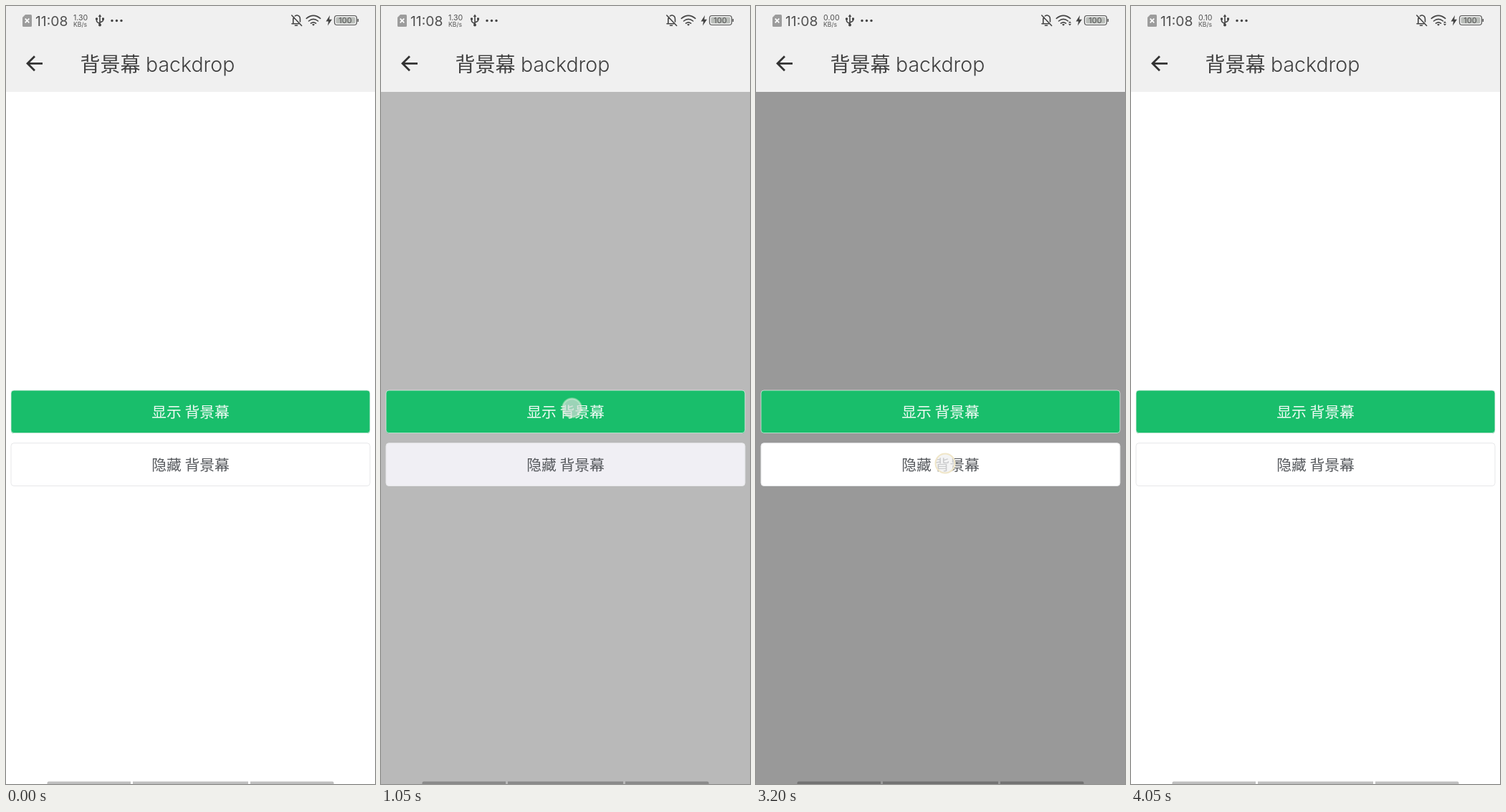
An HTML page for the animation above (4200 ms loop, 515 by 1087 pixels).

```html
<!DOCTYPE html>
<html lang="zh-CN">
<head>
<meta charset="utf-8">
<title>背景幕 backdrop</title>
<style>
html, body { margin: 0; width: 100%; height: 100%; overflow: hidden; background: #fff; }
svg { display: block; width: 515px; height: 1087px; }
text { font-family: Inter, "Noto Sans CJK SC", "Noto Sans CJK", sans-serif; fill: #505050; }
.cjk { font-family: "Noto Sans CJK SC", "Noto Sans CJK", sans-serif; font-weight: 300; }
.title { font-size: 28px; fill: #404040; }
.latin { font-size: 28.5px; font-weight: 300; fill: #404040; }
.label { font-size: 20.8px; text-anchor: middle; }
.rate { font-size: 10.6px; }
.line { fill: none; stroke: #444; stroke-width: 1.6; stroke-linecap: round; stroke-linejoin: round; }
.ink { fill: #444; }

/* every value holds until the next key, as on a 50 ms screen refresh */
.anim { animation: 4200ms step-end infinite; }
.shade { animation-name: shade; opacity: 0; }
.plain { animation-name: press; fill: #fff; }
.touch-a { animation-name: touchA; opacity: 0; }
.touch-b { animation-name: touchB; opacity: 0; }
.fast { animation-name: fast; }
.idle { animation-name: idle; opacity: 0; }
.slow { animation-name: slow; opacity: 0; }
.traffic { animation-name: traffic; opacity: 0; }

@keyframes shade {
  0% { opacity: 0; }
  22.61% { opacity: .024; }
  23.8% { opacity: .15; }
  24.99% { opacity: .275; }
  26.18% { opacity: .4; }
  78.56% { opacity: .388; }
  79.75% { opacity: .263; }
  80.94% { opacity: .135; }
  82.13%, 100% { opacity: 0; }
}
@keyframes press {
  0% { fill: #fff; }
  24.99% { fill: #f0eff4; }
  27.37% { fill: #f0f0f0; }
  45.23% { fill: #fff; }
  78.56% { fill: #f0f0f0; }
  84.51%, 100% { fill: #fff; }
}
@keyframes touchA {
  0% { opacity: 0; }
  21.42% { opacity: 1; }
  24.99% { opacity: .88; }
  26.18% { opacity: .4; }
  27.37%, 100% { opacity: 0; }
}
@keyframes touchB {
  0% { opacity: 0; }
  76.18% { opacity: 1; }
  79.75% { opacity: .8; }
  80.94%, 100% { opacity: 0; }
}
@keyframes fast { 0% { opacity: 1; } 33.32%, 100% { opacity: 0; } }
@keyframes idle { 0% { opacity: 0; } 33.32% { opacity: 1; } 86.89%, 100% { opacity: 0; } }
@keyframes slow { 0% { opacity: 0; } 86.89%, 100% { opacity: 1; } }
@keyframes traffic {
  0% { opacity: 0; }
  33.32% { opacity: 1; }
  52.37% { opacity: 0; }
  73.8%, 100% { opacity: 1; }
}
</style>
</head>
<body>
<svg viewBox="0 0 515 1087">
  <defs>
    <radialGradient id="tip">
      <stop offset="0" stop-color="#d4dcd8" stop-opacity=".8"/>
      <stop offset=".72" stop-color="#d4dcd8" stop-opacity=".8"/>
      <stop offset=".86" stop-color="#eef2e8" stop-opacity=".85"/>
      <stop offset="1" stop-color="#c8e6c0" stop-opacity=".3"/>
    </radialGradient>
  </defs>

  <rect width="515" height="1087" fill="#fff"/>
  <rect class="anim shade" y="120" width="515" height="967"/>
  <rect width="515" height="120" fill="#f0f0f0"/>

  <!-- status bar, left -->
  <path d="M27 12h7.500q1.500 0 1.500 1.500v14q0 1.500-1.500 1.500h-10q-1.500 0-1.500-1.500V16z" fill="#9c9c9c"/>
  <path d="M26.700 17.700l5.600 5.600m0-5.600l-5.600 5.600" stroke="#fff" stroke-width="1.700"/>
  <text x="41" y="28" font-size="19.300">11:08</text>
  <g class="rate">
    <text class="anim fast" x="94" y="20">1.30</text>
    <text class="anim idle" x="94" y="20">0.00</text>
    <text class="anim slow" x="94" y="20">0.10</text>
  </g>
  <text x="94" y="29" font-size="8.600">KB/s</text>
  <path class="line" stroke-width="1.400" d="M131 14v12M126.500 18.500v2.500q0 1.500 4.500 3.500M135.500 18v2q0 1.500-4.500 3"/>
  <path class="ink" d="M131 11.500l2.300 3.500h-4.600zM134 16.500h3v3h-3z"/>
  <circle class="ink" cx="126.500" cy="18" r="1.700"/>
  <circle class="ink" cx="131" cy="26.500" r="2"/>
  <g class="ink">
    <circle cx="148" cy="20.500" r="1.700"/>
    <circle cx="154.500" cy="20.500" r="1.700"/>
    <circle cx="161" cy="20.500" r="1.700"/>
  </g>

  <!-- status bar, right -->
  <path class="line" d="M398.800 13l13.800 14.500M400.800 24.500V18.500q0-2 1-3M403.500 13.800q1.500-1 3-.8 4 .7 4 5.500v3.500M399 24.700h9.500M403.500 27.300h3"/>
  <g class="line" stroke-width="1.800">
    <path d="M419.300 17.300q9.700-8 19.400 0"/>
    <path d="M422.500 21q6.500-5.300 13 0"/>
    <path d="M425.500 24.200q3.500-2.700 7 0"/>
  </g>
  <path class="ink" d="M427 25.700q2-1.200 4 0l-2 2z"/>
  <path class="ink anim traffic" d="M436 23.700l2-2.500 2 2.500zM436 25l2 2.500 2-2.500z"/>
  <path class="ink" d="M452 13l-5.500 8.500h3.500l-1 6 6-8.700h-3.800z"/>
  <rect x="458.500" y="13.500" width="31" height="13" rx="3.500" fill="#f0f0f0" stroke="#555" stroke-width="1.200"/>
  <rect x="460.500" y="15.500" width="27" height="9" rx="2" fill="#b9bdb9"/>
  <path d="M491.300 18v4" stroke="#555" stroke-width="1.600"/>
  <text x="473.500" y="24" font-size="11" text-anchor="middle">100</text>

  <!-- title bar -->
  <path d="M51 80.300H30.500M40 70.300L30 80.300l10 10" fill="none" stroke="#333" stroke-width="2.800"/>
  <text class="cjk title" x="103.500" y="91.500">背景幕</text>
  <text class="latin" x="195" y="92">backdrop</text>

  <!-- buttons -->
  <rect x="7" y="537" width="501" height="60" rx="4" fill="#19be6b"/>
  <rect x="7" y="537" width="501" height="59.500" rx="4" fill="none" stroke="#e4ece8" stroke-opacity=".75"/>
  <text class="cjk label" x="257.500" y="575" style="fill:#f0fbf5">显示 背景幕</text>
  <rect class="anim plain" x="7" y="610.700" width="501" height="59.800" rx="4" stroke="#e6e7e9"/>
  <text class="cjk label" x="257.500" y="649" style="fill:#55585c">隐藏 背景幕</text>

  <!-- finger marks -->
  <circle class="anim touch-a" cx="266.500" cy="561.500" r="14.500" fill="url(#tip)"/>
  <g class="anim touch-b">
    <circle cx="264" cy="639" r="13.500" fill="#f0f0f0" fill-opacity=".75"/>
    <circle cx="264" cy="639" r="13.500" fill="none" stroke="#f0e6c8" stroke-width="2"/>
  </g>

  <!-- navigation hints -->
  <path d="M57.500 1087v-1.500q0-2 2-2H174v3.500zM177 1083.500h161v3.500H177zM341 1083.500h114.500q2 0 2 2v1.500H341z" fill-opacity=".25"/>
</svg>
</body>
</html>
```
